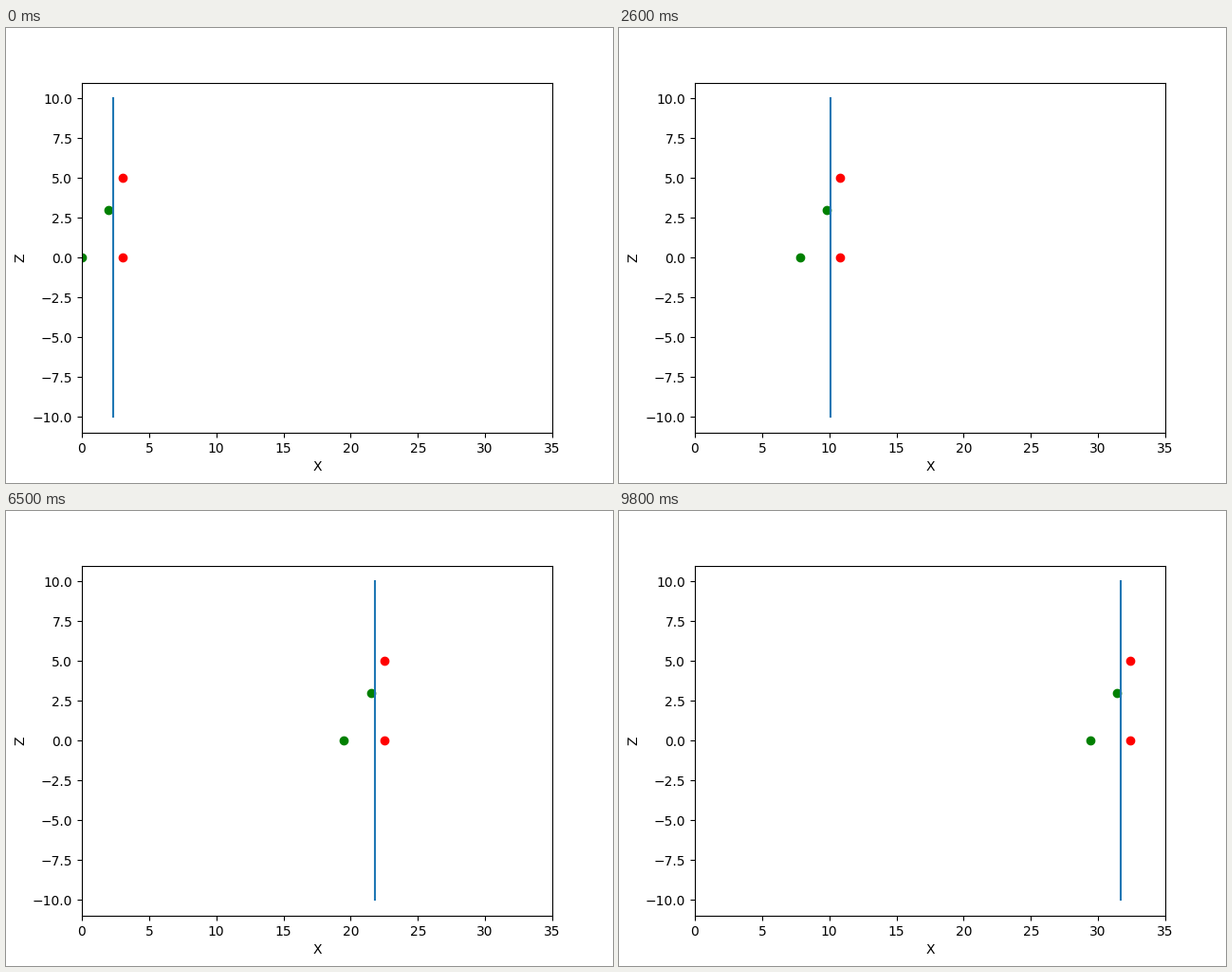
Animation, 640 px wide and 480 px high, one loop 9900 ms. Source, as a matplotlib script:

```python
import matplotlib.pyplot as plt
from matplotlib.animation import FuncAnimation

FRAMES = 99
INTERVAL = 100  # ms
STEP = 0.3      # shift along X per frame

fig, ax = plt.subplots(figsize=(6.4, 4.8), dpi=100)
ax.set(xlim=(0, 35), ylim=(-11, 11), xlabel="X", ylabel="Z")

# Each part: starting x values, z values, line artist
parts = [
    ([0, 2], [0, 3], ax.plot([], [], "go")[0]),
    ([3, 3], [0, 5], ax.plot([], [], "ro")[0]),
    ([2.3, 2.3], [-10, 10], ax.plot([], [], color="C0")[0]),
]


def update(frame):
    shift = STEP * frame
    for xs, zs, artist in parts:
        artist.set_data([x + shift for x in xs], zs)
    return [artist for _, _, artist in parts]


anim = FuncAnimation(fig, update, frames=FRAMES, interval=INTERVAL,
                     repeat=True, repeat_delay=0)
plt.show()
```
